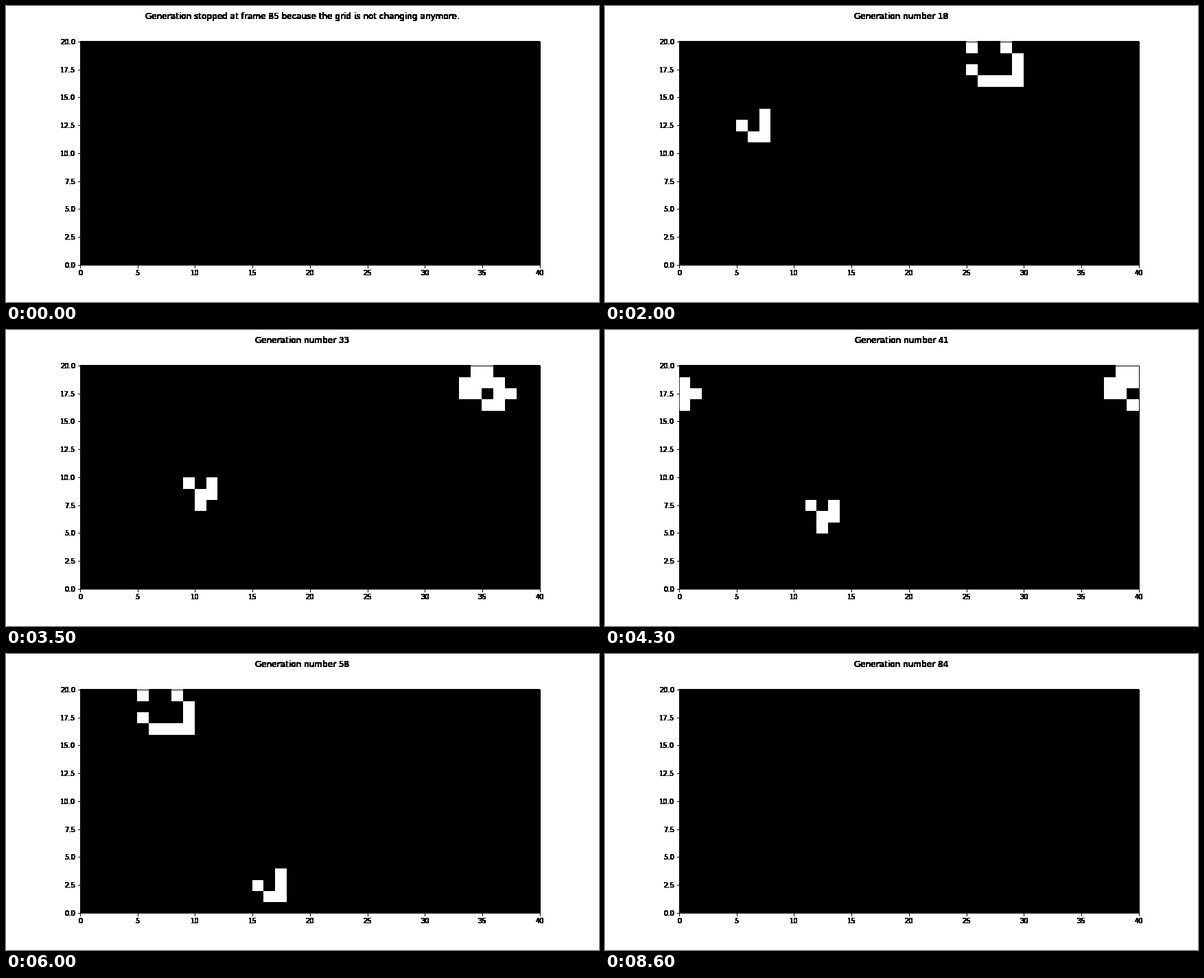
Write a matplotlib script that moves like this. It is 864 px wide and 432 px high and loops after 8.7 s.

```python
import numpy as np
import matplotlib.pyplot as plt
from matplotlib.animation import FuncAnimation

W, H, DPI = 864, 432, 72
COLS, ROWS = 40, 20
LAST_GEN = 84
HOLD = 2  # ticks spent on the closing message
LEFT, RIGHT, BOTTOM, TOP = 0.125, 0.9, 0.125, 0.88

plt.rcParams["font.family"] = "DejaVu Sans"
plt.rcParams["font.size"] = 10

# Patterns from the top row down
GLIDER = [".X.",
          "..X",
          "XXX"]
SPACESHIP = [".XXXX",
             "X...X",
             "....X",
             "X..X."]


def place(grid, pattern, col, top):
    for r, line in enumerate(pattern):
        for c, mark in enumerate(line):
            grid[top - r, col + c] = mark == "X"


def step(grid):
    """One Game of Life generation on a torus."""
    near = sum(np.roll(grid, (dy, dx), (0, 1))
               for dy in (-1, 0, 1) for dx in (-1, 0, 1)) - grid
    return ((near == 3) | ((grid == 1) & (near == 2))).astype(int)


def edges(start, stop, count):
    """Cell borders on whole pixels."""
    pos = np.floor(np.linspace(start, stop, count + 1) + 1e-6)
    pos[-1] = np.ceil(stop - 1e-6)
    return pos.astype(int)


def harden(img, dpi):
    """Turn every touched pixel solid black."""
    out = np.zeros_like(img)
    out[..., 3] = img[..., 3] > 0
    return out, 0, 0


start = np.zeros((ROWS, COLS), int)
place(start, GLIDER, 1, 18)
place(start, SPACESHIP, 16, 18)
gens = [start]
for _ in range(LAST_GEN):
    gens.append(step(gens[-1]))

xs = edges(LEFT * W, RIGHT * W, COLS)
ys = edges(BOTTOM * H, TOP * H, ROWS)


def to_pixels(grid):
    return grid.repeat(np.diff(ys), 0).repeat(np.diff(xs), 1)


fig = plt.figure(figsize=(W / DPI, H / DPI), dpi=DPI, facecolor="white")
ax = fig.add_axes([LEFT, BOTTOM, RIGHT - LEFT, TOP - BOTTOM])
ax.patch.set_visible(False)
ax.set_xlim(0, COLS)
ax.set_ylim(0, ROWS)
ax.set_xticks(np.arange(0, COLS + 1, 5))
ax.set_yticks(np.arange(0, ROWS + 1, 2.5))

board = fig.figimage(to_pixels(start), xo=xs[0], yo=ys[0], origin="lower",
                     cmap="gray", vmin=0, vmax=1, zorder=-1)
title = fig.suptitle("", fontsize=12)

for artist in (title, ax.xaxis, ax.yaxis, ax.spines["top"], ax.spines["right"]):
    artist.set_agg_filter(harden)


def draw(tick):
    gen = tick - HOLD
    if gen < 0:
        title.set_text(f"Generation stopped at frame {LAST_GEN + 1} because "
                       "the grid is not changing anymore.")
        gen = LAST_GEN
    else:
        title.set_text(f"Generation number {gen}")
    board.set_data(to_pixels(gens[gen]))
    return board, title


anim = FuncAnimation(fig, draw, frames=LAST_GEN + 1 + HOLD, interval=100,
                     repeat=True, repeat_delay=0, blit=False)
plt.show()
```
